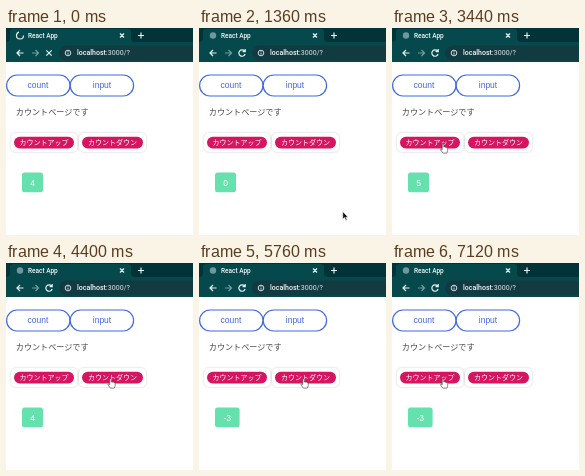
Recreate the animation shown at these times as an HTML page. Size 187 px wide and 207 px high, loop 7200 ms.

```html
<!DOCTYPE html>
<html lang="ja">
<head>
<meta charset="utf-8">
<title>React App</title>
<style>
html, body { margin: 0; width: 100%; height: 100%; overflow: hidden; background: #fff; }
svg { display: block; width: 187px; height: 207px; }
text { font-family: "Liberation Sans", "Noto Sans CJK JP", "Noto Sans CJK", sans-serif; font-size: 8.5px; }
.bar { font-family: Roboto, sans-serif; font-size: 7px; font-weight: 500; fill: #f2f8f8; }
.icon { fill: none; stroke: #e6f0f0; stroke-width: 1.2; }
.tab { fill: #fff; stroke: #4169e1; stroke-width: 1.2; }
.link { fill: #4169e1; text-anchor: middle; }
.copy { font-size: 8.1px; fill: #444; }
.card { fill: #fff; filter: drop-shadow(0 .7px .8px rgba(0, 0, 0, .2)); }
.button { fill: #d6145f; }
.label { fill: #fff; font-size: 7px; text-anchor: middle; }
#value { fill: #fff; text-anchor: middle; }
</style>
</head>
<body>
<svg viewBox="0 0 187 207">
  <rect width="187" height="34" fill="#023338"/>
  <path d="M0 14Q4 14 4 10V4Q4 1 7 1H122Q125 1 125 4V10Q125 14 129 14H187V34H0Z" fill="#06494d"/>
  <rect x="53" y="17.5" width="150" height="15" rx="7.5" fill="#123a41"/>
  <circle id="favicon" cx="14" cy="7.5" r="3.2" fill="#7196a0"/>
  <circle id="spinner" class="icon" cx="14" cy="7.5" r="3.5" stroke-dasharray="15 7"/>
  <text class="bar" x="22" y="9.9" style="font-size:6.5px">React App</text>
  <path class="icon" d="M114 5.5l4 4m0-4l-4 4M132 7.5h6m-3-3v6"/>
  <path class="icon" d="M17.5 25h-6.5m3-3l-3 3 3 3"/>
  <path class="icon" opacity=".5" d="M26 25h6.5m-3-3l3 3-3 3"/>
  <path id="reload" class="icon" d="M45.5 23a3.2 3.2 0 1 0 .6 3M46.2 21v2.6h-2.6"/>
  <path id="stop" class="icon" d="M40.3 22.3l5.4 5.4m0-5.4l-5.4 5.4"/>
  <path class="icon" d="M59.2 25a2.8 2.8 0 1 1 5.6 0 2.8 2.8 0 1 1-5.6 0M62 24.6v2m0-3.6v.8" style="stroke-width:.9"/>
  <text class="bar" x="71" y="27.4">localhost<tspan fill="#b4c8c9">:3000/?</tspan></text>

  <g id="page">
    <rect class="tab" x=".6" y="47" width="63.4" height="21" rx="10.5"/>
    <rect class="tab" x="64.2" y="47" width="63.4" height="21" rx="10.5"/>
    <text class="link" x="32" y="60.3">count</text>
    <text class="link" x="96" y="60.3">input</text>
    <text class="copy" x="9.8" y="87">カウントページです</text>
    <rect class="card" x="5" y="105" width="66.5" height="19" rx="5"/>
    <rect class="card" x="73" y="105" width="67" height="19" rx="5"/>
    <rect class="button" x="8" y="108.7" width="60" height="11.7" rx="5.8"/>
    <rect class="button" x="76" y="108.7" width="61" height="11.7" rx="5.8"/>
    <text class="label" x="38" y="117">カウントアップ</text>
    <text class="label" x="106.5" y="117">カウントダウン</text>
    <rect id="badge" x="16" y="144.5" height="19.8" rx="2.5" fill="#64e1ac"/>
    <text id="value" y="157.5"></text>
  </g>

  <g id="cursor" stroke="#fff" stroke-width=".6" stroke-linejoin="round">
    <path id="arrow" d="M0 0V7.6L1.8 6 3.1 9 4.4 8.4 3.1 5.6H5.5Z" fill="#111"/>
    <path id="hand" d="M-.8 .8Q0-.4 .8 .8V3.4Q1.8 2.8 2.2 3.7 3.2 3.1 3.5 4.1 4.7 3.8 4.7 5V7L3.9 9.6H-.2L-2.6 6.2Q-2.6 4.9-.8 6.2Z" fill="#fff" stroke="#333"/>
  </g>
</svg>
<script>
const LOOP = 7200, STEP = 80;
const $ = id => document.getElementById(id);
const show = (id, on) => $(id).style.display = on ? "" : "none";
const clamp = (v, low, high) => Math.min(high, Math.max(low, v));

// Number of evenly spaced clicks made so far
const clicks = (t, start, gap, total) => clamp(Math.floor((t - start) / gap) + 1, 0, total);

function ease(t, start, end) {
  const u = clamp((t - start) / (end - start), 0, 1);
  return u * u * (3 - 2 * u);
}

function valueAt(t) {
  if (t < 400) return 4;
  return clicks(t, 2400, 240, 5) - clicks(t, 4210, 196, 10) + clicks(t, 6800, 240, 2);
}

function cursorAt(t) {
  const enter = ease(t, 1300, 1840);
  const across = ease(t, 3520, 4000) - ease(t, 6240, 6640);
  return [147 - 96 * enter + 53.5 * across, 186 - 70.5 * enter];
}

function draw(now) {
  const t = Math.floor(now % LOOP / STEP) * STEP;
  const value = valueAt(t);
  const width = 21 + (value < 0 ? 3.6 : 0) - (Math.abs(value) === 1 ? 1 : 0);
  $("badge").setAttribute("width", width);
  $("value").setAttribute("x", 16 + width / 2);
  $("value").textContent = value;

  const loading = t < 640;
  show("page", t < 240 || t >= 400);
  show("spinner", loading);
  show("favicon", !loading);
  show("stop", loading);
  show("reload", !loading);
  $("spinner").setAttribute("transform", `rotate(${t * .45} 14 7.5)`);

  const [x, y] = cursorAt(t);
  const over = y > 109 && y < 120.5 && (x > 8 && x < 68 || x > 76 && x < 137);
  show("cursor", t >= 960);
  show("hand", over);
  show("arrow", !over);
  $("cursor").setAttribute("transform", `translate(${x} ${y})`);
}

const start = performance.now();
function tick() {
  draw(performance.now() - start);
  requestAnimationFrame(tick);
}
tick();
</script>
</body>
</html>
```
